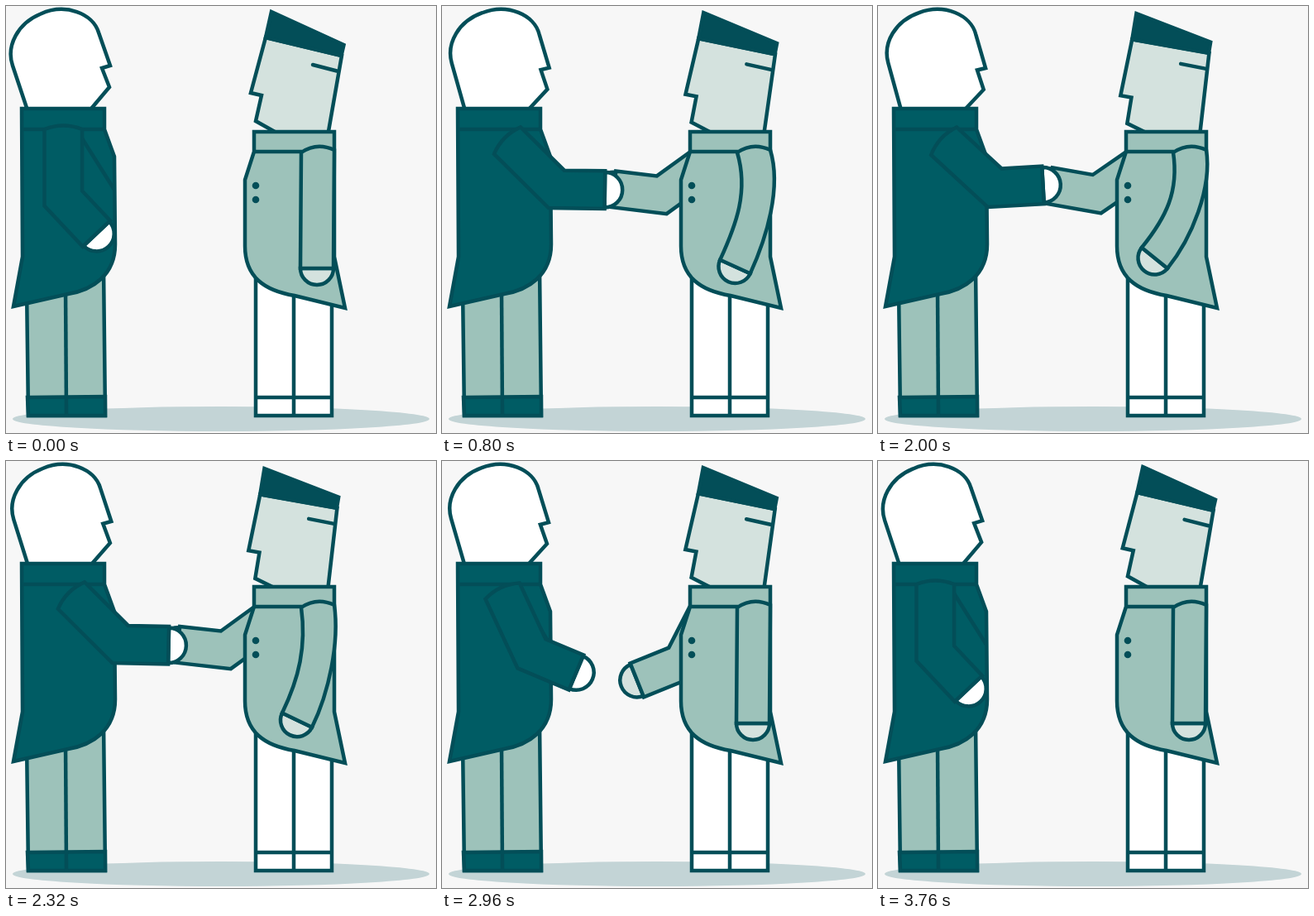
An HTML page with a canvas that plays this animation: 520x516 px, repeating every 3840 ms.

```html
<!DOCTYPE html>
<html lang="en">
<head>
<meta charset="utf-8">
<title>Handshake</title>
<style>
html, body { margin: 0; width: 100%; height: 100%; overflow: hidden; background: #f7f7f7; }
canvas { display: block; }
</style>
</head>
<body>
<canvas id="stage" width="520" height="516"></canvas>
<script>
const ctx = document.getElementById('stage').getContext('2d');
const LOOP = 3840, STEP = 80;
const INK = '#034e58', COAT = '#005c64', SAGE = '#9dc2ba', SKIN = '#d4e2de', WHITE = '#fff';
const rad = deg => deg * Math.PI / 180;
const mix = (a, b, p) => a + (b - a) * p;
const clamp = x => Math.max(0, Math.min(1, x));
const smooth = (from, to, t) => { const p = clamp((t - from) / (to - from)); return p * p * (3 - 2 * p); };

// Point reached from p by going a distance in a direction
const move = (p, angle, dist) => [p[0] + Math.cos(angle) * dist, p[1] + Math.sin(angle) * dist];

// Interpolates rows of [time, ...values]
function track(keys, t) {
  const i = Math.max(1, keys.findIndex(k => k[0] > t));
  const a = keys[i - 1], b = keys[i], p = (t - a[0]) / (b[0] - a[0]);
  return a.slice(1).map((v, j) => mix(v, b[j + 1], p));
}

function shape(d, fill) {
  const path = new Path2D(d);
  if (fill) { ctx.fillStyle = fill; ctx.fill(path); }
  ctx.stroke(path);
}

function hand(center, angle, radius, fill) {
  ctx.beginPath();
  ctx.arc(center[0], center[1], radius, angle - Math.PI / 2, angle + Math.PI / 2);
  ctx.closePath();
  ctx.fillStyle = fill;
  ctx.fill();
  ctx.stroke();
}

function turned(x, y, deg, draw) {
  ctx.save();
  ctx.translate(x, y);
  ctx.rotate(rad(deg));
  ctx.translate(-x, -y);
  draw();
  ctx.restore();
}

// Jointed sleeve with a mitred elbow, a rounded shoulder and a hand
function jointedArm(shoulder, length, upper, fore, half, sleeve, skin) {
  const quarter = Math.PI / 2;
  const elbow = move(shoulder, upper, length), wrist = move(elbow, fore, 58.5);
  const miter = half / Math.cos((fore - upper) / 2), bend = (upper + fore) / 2;
  const side = s => [
    move(shoulder, upper + s * quarter, half),
    move(elbow, bend + s * quarter, miter),
    move(wrist, fore + s * quarter, half)
  ];
  const outer = side(1), inner = side(-1), cap = move(shoulder, upper, -9);
  hand(wrist, fore, half - 1.5, skin);
  shape(`M${outer.join('L')}L${inner.reverse().join('L')}Q${cap} ${outer[0]}Z`, sleeve);
}

// Cuff centre, cuff angle and outward bow of the hanging sleeve
const nearArm = [
  [0, 376, 317, 90, 0], [80, 376, 317, 90, 0], [800, 354.5, 315, 114.6, 14],
  [1440, 341.5, 309, 126, 7], [2000, 334.5, 304.5, 129, 7],
  [2180, 341.5, 309, 126, 7], [2400, 358, 315.5, 110, 6],
  [2600, 376, 317, 90, 0], [LOOP, 376, 317, 90, 0]
];

function softArm(t) {
  const [x, y, deg, bow] = track(nearArm, t);
  const angle = rad(deg), cuff = [x, y];
  const back = move(cuff, angle - Math.PI / 2, 20), front = move(cuff, angle + Math.PI / 2, 20);
  hand(cuff, angle, 20, SKIN);
  shape(`M357 177C${357 + bow} 224 ${move(front, angle, -47)} ${front}L${back}` +
    `C${move(back, angle, -47)} ${397 + bow} 220 397 174Q376 164 357 177Z`, SAGE);
}

function leftMan(t, grip, shake) {
  shape('M25 340L27 495L120 495L118 315Z', SAGE);
  shape('M26 473L120 472L120 495L27 495Z', COAT);
  shape('M72 340L73 495');
  turned(72, 150, 1.6 * (1 - Math.cos(2 * Math.PI * t / 1280)), () =>
    shape('M28 132L8 72C0 48 14 21 42 9.5C72 -4 105 9 112 32L126 72L116 75L125 98L98 130', WHITE));
  shape('M19 124H119V149L131 182L132 288C132 325 105 343 75 348L9 363L20 303Z', COAT);
  shape('M19 149H119M92 160L131 222');
  const upper = rad(mix(90, 44.9 + 2.3 * shake, grip));
  const fore = rad(mix(46.7, 1.2 + 4.5 * shake, grip));
  const pivot = [92 + 3 * grip, 149 - 2.5 * grip];
  jointedArm(move(pivot, upper + Math.PI / 2, 22.7), 83.5, upper, fore, 22.8, COAT, WHITE);
}

function farArm(grip, shake) {
  const reach = Math.pow(grip, 0.8);
  const upper = rad(mix(70, 144 - 1.5 * shake, reach));
  const fore = rad(mix(112, 186.5 - 3.6 * shake, reach));
  const shoulder = move(move([308.5, 185], upper, -3), upper - Math.PI / 2, 10);
  jointedArm(shoulder, 63, upper, fore, 22, SAGE, SKIN);
}

const lean = [
  [0, 0], [800, 0.55], [1440, 0.7], [2000, 1], [2320, 1],
  [2640, 0.92], [2960, 0.6], [3760, 0.08], [LOOP, 0]
];

function rightMan(t) {
  shape('M302 325H394V495H302Z', WHITE);
  shape('M348 340V495M302 473H394');
  turned(350, 152, -3.4 * track(lean, t)[0], () => {
    shape('M388.5 160L406 60L314 38L296 105L309 108L302 139L334 157', SKIN);
    shape('M321 7L408.5 47L405.5 60L314 38Z', INK);
    ctx.lineCap = 'round';
    shape('M371 71L400 78.5');
    ctx.lineCap = 'butt';
  });
  shape('M300 152H397V303L410 365L349 350C313 344 289 328 289 290V210L300 176Z', SAGE);
  shape('M300 176H358');
  ctx.fillStyle = INK;
  for (const y of [217, 234]) {
    ctx.beginPath();
    ctx.arc(302, y, 4.3, 0, 2 * Math.PI);
    ctx.fill();
  }
  softArm(t);
}

function draw(t) {
  const grip = smooth(80, 800, t) * (1 - smooth(2640, 3360, t));
  const shake = -Math.cos(2 * Math.PI * (Math.min(t, 2640) - 2000) / 427) * smooth(720, 960, t);
  ctx.fillStyle = '#f7f7f7';
  ctx.fillRect(0, 0, 520, 516);
  ctx.fillStyle = '#c3d4d6';
  ctx.beginPath();
  ctx.ellipse(260, 499, 252, 15, 0, 0, 2 * Math.PI);
  ctx.fill();
  ctx.strokeStyle = INK;
  ctx.lineWidth = 4.5;
  if (grip > 0) farArm(grip, shake);
  rightMan(t);
  leftMan(t, grip, shake);
}

const start = performance.now();
function tick() {
  const t = (performance.now() - start) % LOOP;
  draw(Math.floor(t / STEP) * STEP);
  requestAnimationFrame(tick);
}
tick();
</script>
</body>
</html>
```
